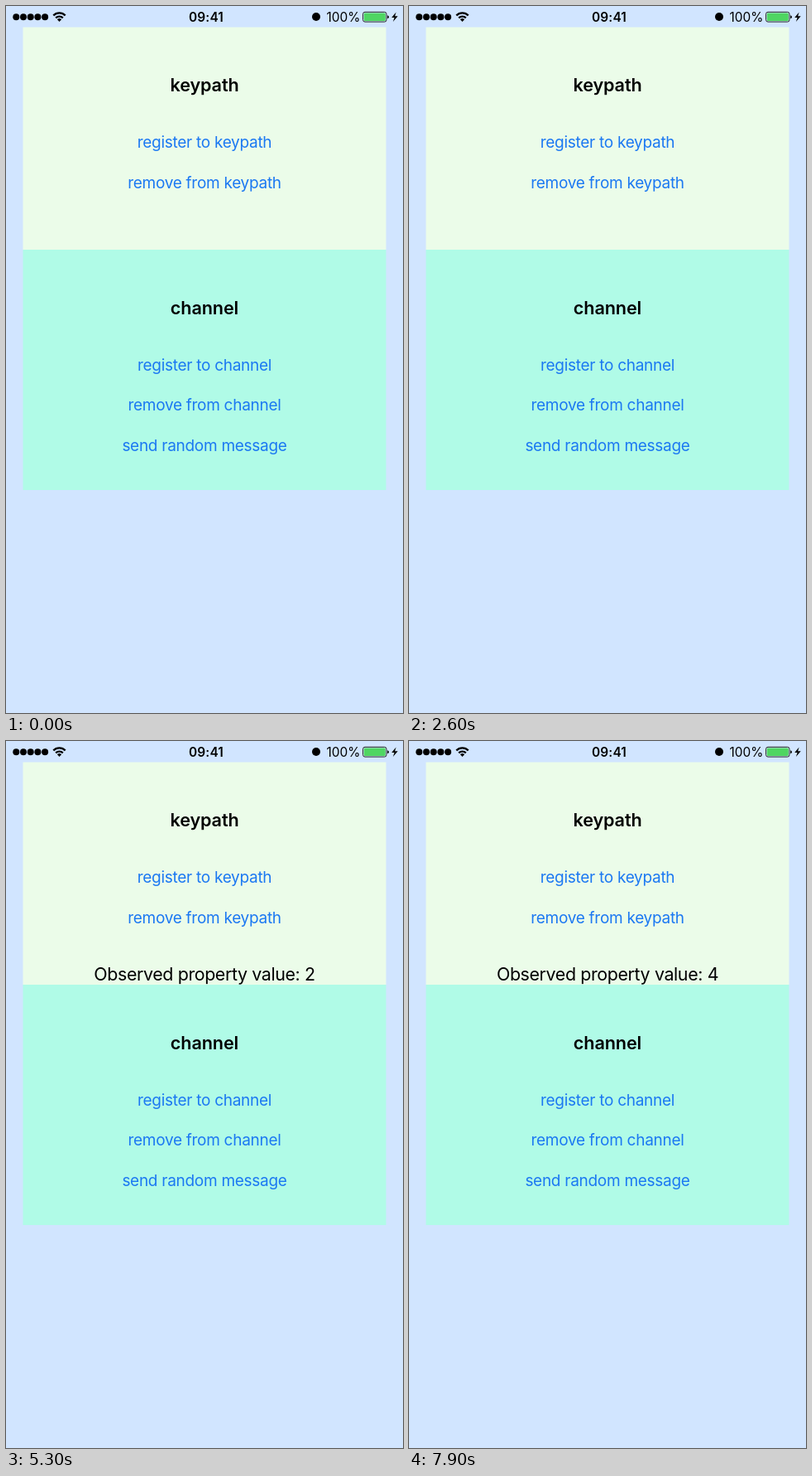
An HTML page for the animation above (8000 ms loop, 480x853 px).

```html
<!DOCTYPE html>
<html lang="en">
<head>
<meta charset="utf-8">
<style>
  html, body { margin: 0; width: 100%; height: 100%; overflow: hidden; background: #d1e5ff; }
  svg { display: block; width: 100vw; height: 100vh; }
  text { font-family: Inter, Roboto, sans-serif; text-anchor: middle; }
  .title { font-size: 21.6px; font-weight: 600; letter-spacing: -.1px; }
  .button { font-size: 19px; letter-spacing: -.28px; fill: #1b78f2; }
  .label { font-size: 21.4px; letter-spacing: -.38px; }
  .status { font-size: 15.4px; }
  .clock { font-weight: 600; letter-spacing: .2px; }
</style>
</head>
<body>
<svg viewBox="0 0 480 853">
  <g id="dots"></g>
  <g fill="none" stroke="#000" stroke-width="2.3">
    <path d="M57.3 11.4a10 10 0 0 1 14.4 0M60.2 14.4a6 6 0 0 1 8.6 0"/>
    <path d="M64.5 19l-2.6-2.8a3.7 3.7 0 0 1 5.2 0z" fill="#000" stroke="none"/>
  </g>
  <text class="status clock" x="242" y="18.5">09:41</text>
  <circle cx="375" cy="13" r="5"/>
  <text class="status" x="408" y="18.5">100%</text>
  <rect x="431.6" y="7.3" width="28.4" height="11.8" rx="2.4" fill="none" stroke="#222" stroke-width="1"/>
  <rect x="432.8" y="8.5" width="26" height="9.4" rx="1.2" fill="#4fd662"/>
  <path d="M461.2 11.2q1.8.4 1.8 2t-1.8 2z"/>
  <path d="M471.6 7.6l-5.4 6.3h3.4l-1.7 5 5.8-6.6h-3.5z"/>

  <rect x="20.5" y="25.6" width="439" height="268.4" fill="#ebfce9"/>
  <rect x="20.5" y="294" width="439" height="290" fill="#b0fbe7"/>
  <text class="title" x="240" y="103">keypath</text>
  <text class="button" id="register" x="240" y="170.8">register to keypath</text>
  <text class="button" x="240" y="219.5">remove from keypath</text>
  <text class="label" id="value" x="240" y="288.5"></text>
  <text class="title" x="240" y="371.5">channel</text>
  <text class="button" x="240" y="439.6">register to channel</text>
  <text class="button" x="240" y="488.2">remove from channel</text>
  <text class="button" x="240" y="537">send random message</text>

  <g id="touch">
    <circle cx="256" cy="160" r="29.3" fill="#000" fill-opacity=".26"/>
    <circle cx="256" cy="160" r="25.6" fill="#000" fill-opacity=".53"/>
  </g>
</svg>
<script>
  const LOOP = 8000, DOWN = 1800, UP = 2100, FADE = 300;
  const PERIOD = 2000, FIRST_VALUE = 4000;
  const [dots, register, value, touch] =
    ['dots', 'register', 'value', 'touch'].map(id => document.getElementById(id));

  dots.innerHTML = Array.from({ length: 5 }, (_, i) =>
    `<circle cx="${12.3 + i * 8.7}" cy="13.2" r="4"/>`).join('');

  function draw(now) {
    const t = now % LOOP;
    const fade = Math.min(1, Math.max(0, (t - UP) / FADE));
    const press = t < DOWN ? 0 : 1 - fade;
    touch.setAttribute('opacity', press);
    register.setAttribute('opacity', 1 - 0.8 * press);
    // The observed value goes up by two on every update.
    const count = Math.floor((t - FIRST_VALUE) / PERIOD) + 1;
    const text = count > 0 ? `Observed property value: ${count * 2}` : '';
    if (value.textContent !== text) value.textContent = text;
  }

  const start = performance.now();
  function tick() {
    draw(performance.now() - start);
    requestAnimationFrame(tick);
  }
  tick();
</script>
</body>
</html>
```
